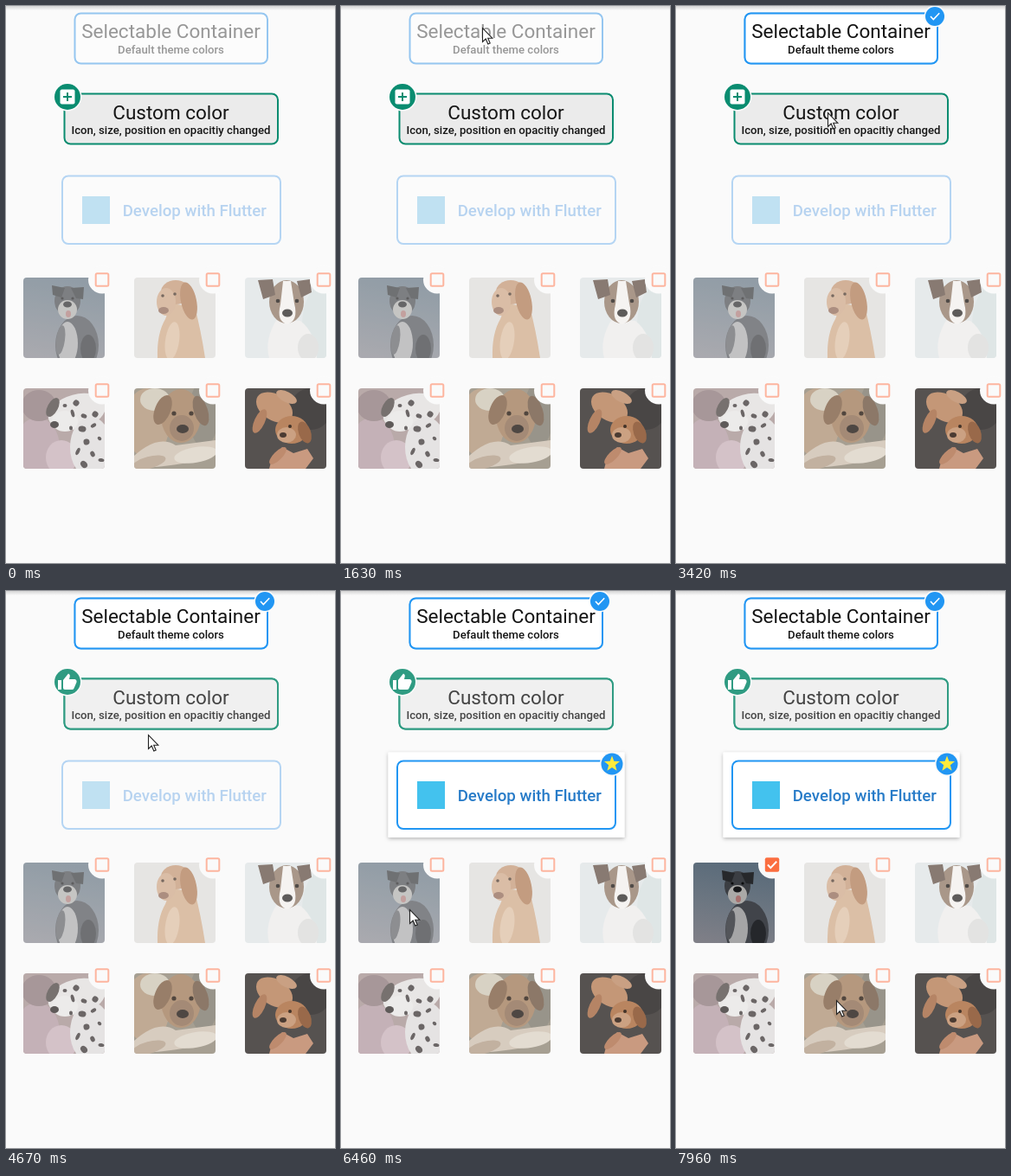
An HTML page that plays this animation: 380x644 px, repeating every 8 s.

```html
<!DOCTYPE html>
<html lang="en">
<head>
<meta charset="utf-8">
<title>Selectable containers</title>
<style>
  html, body { margin: 0; width: 100%; height: 100%; overflow: hidden; background: #fafafa; }
  svg { display: block; width: 380px; height: 644px; font-family: Roboto, sans-serif; }
  text { text-anchor: middle; }
  .title { font-size: 22.5px; }
  .sub { font-size: 13.15px; font-weight: 500; }
  .label { font-size: 18.7px; font-weight: 500; }
</style>
</head>
<body>
<svg id="stage" viewBox="0 0 380 644"></svg>
<script>
const PAGE = '#fafafa', LOOP = 8000, FADE = 600;
const CLICKS = { theme: 2250, custom: 3850, flutter: 5560, photo: 7250 };

// Pointer stops: time, x, y
const POINTER = [
  [400, 382, 526], [1500, 163, 25], [2600, 163, 25], [3300, 175, 123],
  [4150, 175, 123], [4600, 164, 165], [5100, 163, 175], [5400, 148, 236],
  [5500, 146, 240], [5630, 119, 284], [6350, 79, 368], [7400, 79, 368],
  [7960, 185, 473], [8000, 185, 473]
];

const rect = (x, y, w, h, r, attrs) => `<rect x="${x}" y="${y}" width="${w}" height="${h}" rx="${r}" ${attrs}/>`;
const circle = (x, y, r, fill) => `<circle cx="${x}" cy="${y}" r="${r}" fill="${fill}"/>`;
const oval = (x, y, rx, ry, fill, turn = 0) =>
  `<ellipse cx="${x}" cy="${y}" rx="${rx}" ry="${ry}" fill="${fill}" transform="rotate(${turn} ${x} ${y})"/>`;
const shape = (d, fill) => `<path d="${d}" fill="${fill}"/>`;
const line = (d, color, width) => `<path d="${d}" fill="none" stroke="${color}" stroke-width="${width}"/>`;
const text = (cls, x, y, fill, str) => `<text class="${cls}" x="${x}" y="${y}" fill="${fill}">${str}</text>`;
const at = (x, y, body) => `<g transform="translate(${x} ${y})">${body}</g>`;
const layer = (id, body) => `<g id="${id}">${body}</g>`;
const badge = (x, y, r, fill, icon) => at(x, y, circle(0, 0, r + 1.5, PAGE) + circle(0, 0, r, fill) + icon);
const frame = (x, y, w, h, fill, stroke) => rect(x, y, w, h, 7, `fill="${fill}" stroke="${stroke}" stroke-width="2"`);

function star(r, fill) {
  let d = '';
  for (let i = 0; i < 10; i++) {
    const a = i * Math.PI / 5, q = i % 2 ? r * 0.42 : r;
    d += `${i ? 'L' : 'M'}${(q * Math.sin(a)).toFixed(2)} ${(-q * Math.cos(a)).toFixed(2)}`;
  }
  return shape(d + 'Z', fill);
}
const check = (width = 1.6) => line('M-5 0L-1.7 3.6L5.2 -3.8', '#fff', width);
const plusBox = green => rect(-8.5, -8.5, 17, 17, 2, 'fill="#fff"') + line('M-5 0H5M0 -5V5', green, 2);
const thumb = shape('M-11 -2H-7V9H-11ZM-5 -2L1 -9.5Q3.5 -8.5 2.6 -5.5L2 -3H8.5Q11 -2.5 10.5 .5L7.5 7.5Q7 9 5 9H-3Q-5 9 -5 7Z', '#fff');

const themeCard = c => frame(79.5, 8.5, 222.5, 58, c.fill, c.edge) +
  text('title', 190.5, 37, c.ink, 'Selectable Container') +
  text('sub', 190.5, 55, c.ink, 'Default theme colors');

const customCard = c => frame(67.5, 101.5, 246.5, 58, c.fill, c.edge) +
  text('title', 190.5, 130.5, c.ink, 'Custom color') +
  text('sub', 190.5, 148, c.ink, 'Icon, size, position en opacitiy changed') +
  badge(71, 105, 15, c.edge, c.icon);

const flutterCard = c => frame(65, 196.5, 252, 78.5, c.fill, c.edge) +
  rect(88, 220, 32, 32, 0, `fill="${c.logo}"`) +
  text('label', 217.8, 243, c.ink, 'Develop with Flutter');

// Each picture fills a 94 x 93 tile
const pictures = [
  rect(0, 0, 94, 93, 0, 'fill="url(#slate)"') +
    oval(62, 78, 25, 34, '#41444a') + oval(51, 76, 12, 25, '#a5a5a6') + oval(75, 82, 9, 16, '#25272b') +
    oval(51, 27, 15, 17, '#3b3e43') + shape('M34 20L33 9L48 12L44 23ZM55 12L70 11L69 25L61 24Z', '#26282b') +
    oval(51, 37, 11, 11, '#aaa9a7') + oval(51, 31, 5, 3.5, '#17181a') + oval(52, 42, 3, 4, '#a7706e') +
    circle(45, 24, 1.6, '#0b0c0d') + circle(57, 24, 1.6, '#0b0c0d') + oval(43, 72, 5, 17, '#53555a', 8),
  rect(0, 0, 94, 93, 0, 'fill="#e6e5e3"') +
    shape('M27 93Q26 65 36 48L43 30L70 34Q77 60 82 93Z', '#dbbfa6') +
    oval(48, 17, 17, 14, '#d2b198') + oval(37, 28, 11, 16, '#dabda6') + oval(63, 27, 9, 22, '#c39c80', -12) +
    oval(34, 38, 6, 4, '#ac8e80') + circle(33, 21, 1.8, '#776960') + circle(47, 19, 1.8, '#776960') +
    oval(44, 73, 8, 22, '#e5cfba', 8),
  rect(0, 0, 94, 93, 0, 'fill="#e6eaeb"') + oval(88, 55, 22, 45, '#dfe6e6') +
    shape('M28 93Q22 72 37 48L64 50Q82 64 83 93Z', '#f1f0ef') + oval(73, 81, 12, 16, '#e3e3e2') +
    oval(48, 28, 20, 25, '#a99789') + shape('M15 3L32 2L35 20L21 25ZM60 4L75 2L77 17L65 23Z', '#887a72') +
    shape('M44 4L53 4L57 30Q62 50 49 54Q36 51 41 31Z', '#f5f3f1') + oval(49, 41, 6, 4.5, '#5d5b5a') +
    circle(38, 27, 2.3, '#504b48') + circle(60, 27, 2.3, '#504b48'),
  rect(0, 0, 94, 93, 0, 'fill="#b9aaa9"') + oval(16, 68, 26, 34, '#c4b1b7') + oval(18, 20, 20, 18, '#a79799') +
    oval(44, 80, 18, 20, '#d4c2c8') + oval(62, 27, 34, 20, '#e8e6e5', -15) + oval(78, 68, 24, 35, '#e5e3e3') +
    oval(48, 38, 15, 12, '#ecebea') + oval(34, 22, 6, 12, '#77716f', 28) + oval(36, 42, 5, 4, '#5e5a59') +
    [[48, 20], [61, 17], [57, 29], [70, 32], [81, 43], [68, 47], [88, 58], [73, 62], [63, 73], [80, 76], [90, 83], [70, 88], [55, 46], [83, 30]]
      .map(([x, y], i) => oval(x, y, 2.5 + i % 3, 2 + i % 2 * 1.5, '#6b6666', i * 37)).join(''),
  rect(0, 0, 94, 93, 0, 'fill="#a69f92"') + oval(15, 40, 26, 40, '#c0aa94') + oval(80, 30, 17, 38, '#98948a') +
    oval(24, 13, 17, 13, '#d8d2c4') + oval(54, 32, 23, 31, '#b5987e') + oval(33, 25, 9, 18, '#987e69', 22) +
    oval(77, 26, 8, 18, '#8c7868', -18) + oval(55, 46, 14, 15, '#a48a76') + oval(56, 47, 7, 5, '#4e4743') +
    circle(46, 29, 2.6, '#51463e') + circle(66, 29, 2.6, '#51463e') +
    shape('M0 78Q28 53 48 66L94 60V77Q70 88 0 93Z', '#d7ccbf') + oval(71, 77, 25, 9, '#e3dcd1', -10) + oval(17, 86, 20, 7, '#c2b1a0', -15),
  rect(0, 0, 94, 93, 0, 'fill="#565250"') + oval(76, 24, 24, 24, '#494645') +
    oval(34, 22, 23, 15, '#c49777', 32) + oval(17, 38, 6, 15, '#b58465', 25) + oval(48, 10, 13, 6, '#c9a083', 28) +
    oval(54, 48, 19, 16, '#b98560') + oval(69, 51, 7, 13, '#99694a', -20) + oval(48, 54, 11, 9, '#cba182') +
    oval(44, 54, 4, 3, '#4b3b32') + circle(52, 44, 2, '#433329') +
    shape('M28 93L31 82L43 68L56 75L72 70L79 81L70 93Z', '#c99a80') + oval(38, 78, 13, 5, '#be8b6e', -45)
];

const SALMON = '#fdb59f';
const emptyBox = rect(-7.3, -7.3, 14.6, 14.6, 1.5, `fill="none" stroke="${SALMON}" stroke-width="2"`);
const fullBox = rect(-8.2, -8.2, 16.4, 16.4, 2, 'fill="#fb6e40"') + check(2);

const tiles = pictures.map((body, i) => at(20 + i % 3 * 128, 314 + (i > 2) * 128,
  `<g id="picture${i}" clip-path="url(#tile)">${body}</g>` + circle(91, 2.5, 16, PAGE) +
  at(91, 2.5, i ? emptyBox : layer('boxOff', emptyBox) + layer('boxOn', fullBox)))).join('');

const BLUE = '#2196f3', GREEN = '#0a8c70', GREEN_ON = '#2f9b82';
const stage = document.getElementById('stage');
stage.innerHTML = `
  <defs>
    <clipPath id="tile">${rect(0, 0, 94, 93, 4, '')}</clipPath>
    <linearGradient id="slate" x1="0.4" y1="0" x2="0.2" y2="1">
      <stop stop-color="#5a6b7a"/><stop offset=".5" stop-color="#6c7681"/><stop offset="1" stop-color="#7f7f87"/>
    </linearGradient>
    <linearGradient id="bar" x2="0" y2="1"><stop stop-color="#d4d4d4"/><stop offset="1" stop-color="${PAGE}"/></linearGradient>
    <filter id="shadow" x="-10%" y="-10%" width="120%" height="130%">
      <feDropShadow dx="0" dy="1.5" stdDeviation="2" flood-color="#000" flood-opacity=".28"/>
    </filter>
  </defs>
  ${rect(0, 0, 380, 644, 0, `fill="${PAGE}"`)}
  ${rect(0, 0, 380, 5, 0, 'fill="url(#bar)"')}
  ${themeCard({ fill: '#fcfcfc', edge: '#95c6f0', ink: '#979797' })}
  ${layer('themeBadge', badge(299, 12, 11, '#90caf9', check()))}
  ${layer('themeOn', themeCard({ fill: '#fff', edge: BLUE, ink: '#141414' }) + badge(299, 12, 11, BLUE, check()))}
  ${customCard({ fill: '#ebebeb', edge: GREEN, ink: '#161616', icon: layer('plus', plusBox(GREEN)) + layer('thumb', thumb) })}
  ${layer('customOn', customCard({ fill: '#f0f0f0', edge: GREEN_ON, ink: '#444', icon: thumb }))}
  ${flutterCard({ fill: '#fbfbfb', edge: '#b5d5f3', logo: '#c0e1f2', ink: '#b7d3f0' })}
  ${layer('flutterBadge', badge(313, 200, 12.5, '#add7f5', star(9, '#f8f3b0')))}
  ${layer('flutterOn', rect(54.5, 186.5, 273, 98.5, 1, 'fill="#fff" filter="url(#shadow)"') +
    flutterCard({ fill: '#fff', edge: BLUE, logo: '#43c2ee', ink: '#277bc8' }) + badge(313, 200, 12.5, BLUE, star(9.5, '#ffeb3b')))}
  ${tiles}
  <path id="pointer" d="M.5 .5V16.5L4.2 13L6.8 19L9.2 18L6.7 12.2H11.8Z" fill="#fff" stroke="#222" stroke-width="1.1"/>`;

const el = id => document.getElementById(id);
const ease = p => p * p * (3 - 2 * p);
const show = (id, visible) => el(id).setAttribute('visibility', visible ? 'visible' : 'hidden');
const fade = (id, amount) => el(id).setAttribute('opacity', amount);
const progress = (t, start, span = FADE) => Math.min(1, Math.max(0, (t - start) / span));

function pointerAt(t) {
  const next = Math.max(1, POINTER.findIndex(stop => stop[0] > t));
  const [t0, x0, y0] = POINTER[next - 1], [t1, x1, y1] = POINTER[next];
  const p = ease(progress(t, t0, t1 - t0));
  return [x0 + (x1 - x0) * p, y0 + (y1 - y0) * p].map(Math.round);
}

function draw(t) {
  for (const name of ['theme', 'custom', 'flutter']) fade(name + 'On', progress(t, CLICKS[name]));
  show('themeBadge', t >= CLICKS.theme);
  show('plus', t < CLICKS.custom);
  show('thumb', t >= CLICKS.custom);
  show('flutterBadge', t >= CLICKS.flutter);

  const picked = progress(t, CLICKS.photo);
  fade('picture0', 0.65 + 0.35 * picked);
  show('boxOff', t < CLICKS.photo);
  show('boxOn', t >= CLICKS.photo);
  fade('boxOn', 0.55 + 0.45 * picked);

  show('pointer', t >= POINTER[0][0]);
  el('pointer').setAttribute('transform', `translate(${pointerAt(t)})`);
}

const start = performance.now();
function tick() {
  draw((performance.now() - start) % LOOP);
  requestAnimationFrame(tick);
}
tick();
</script>
</body>
</html>
```
